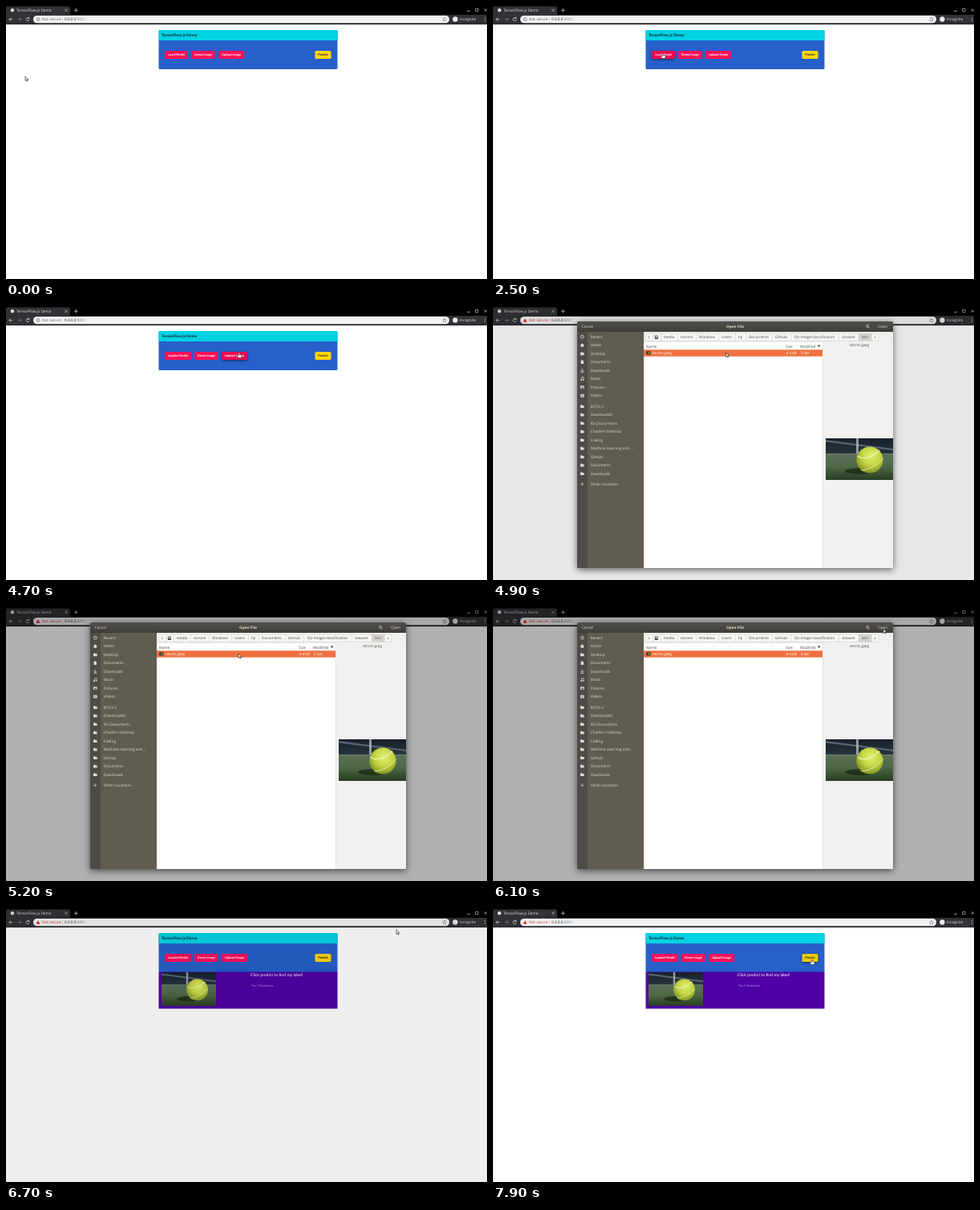
Recreate the animation shown at these times as an HTML page. Size 600 by 341 pixels, loop 8 s.

```html
<!DOCTYPE html>
<html lang="en">
<head>
<meta charset="utf-8">
<title>TensorFlow.js Demo</title>
<style>
html, body { margin: 0; width: 100%; height: 100%; overflow: hidden; background: #fff; }
svg { display: block; width: 100%; height: 100%; }
text { font-family: "Open Sans", "Noto Sans", sans-serif; font-size: 4.7px; text-rendering: geometricPrecision; white-space: pre; }
.app text { font-family: Lato, Inter, sans-serif; }
.line { fill: none; stroke-linecap: round; stroke-linejoin: round; }
</style>
</head>
<body>
<svg id="stage" viewBox="0 0 600 341" preserveAspectRatio="none"></svg>
<script>
const LOOP = 8000, STEP = 100;
const OPEN_AT = 4800, CLOSE_AT = 6600, LOADED_AT = 3100;

const rect = (x, y, w, h, fill, more = '') =>
  `<rect x="${x}" y="${y}" width="${w}" height="${h}" fill="${fill}" ${more}/>`;
const text = (x, y, label, fill, more = '') =>
  `<text x="${x}" y="${y}" fill="${fill}" ${more}>${label}</text>`;
const line = (d, stroke, width = 0.7, more = '') =>
  `<path class="line" d="${d}" stroke="${stroke}" stroke-width="${width}" ${more}/>`;
const shape = (d, fill, more = '') => `<path d="${d}" fill="${fill}" ${more}/>`;
const circle = (x, y, r, fill, more = '') =>
  `<circle cx="${x}" cy="${y}" r="${r}" fill="${fill}" ${more}/>`;
const middle = 'text-anchor="middle"';

function browser() {
  const pale = '#dadce0';
  return rect(0, 0, 600, 11, '#000') +
    shape('M0 11V2Q0 .5 2 .5H78Q80 .5 80 3V11Z', '#303236') +
    rect(0, 11, 600, 12, '#303236') + rect(0, 22.5, 600, 0.6, '#17181a') +
    circle(8, 5.3, 2.2, pale) +
    text(13, 7, 'TensorFlow.js Demo', '#e8eaed') +
    line('M73.5 3.8l3 3m0-3l-3 3', pale, 0.6) +
    line('M85.3 5.3h4m-2-2v4', pale, 0.7) +
    line('M575.5 6.3h3', pale, 0.7) +
    line('M586 3.5h3v3.2h-3z', pale, 0.6) +
    line('M597 3.8l2.6 2.6m0-2.6l-2.6 2.6', pale, 0.7) +
    line('M8 16.6H4m1.8-1.9L4 16.6l1.8 1.9', pale) +
    line('M15 16.6h4m-1.8-1.9l1.8 1.9-1.8 1.9', '#85878a') +
    line('M28.6 15.2A2.1 2.1 0 1 0 29 17.2M28.9 14v1.5h-1.5', pale) +
    rect(34, 12, 519, 9.3, '#f1f3f4', 'rx="4.65"') +
    `<g id="info">${circle(40, 16.6, 2, 'none', 'stroke="#5f6368" stroke-width=".6"')}${rect(39.7, 16.2, 0.6, 1.6, '#5f6368')}${rect(39.7, 15.3, 0.6, 0.6, '#5f6368')}</g>` +
    `<g id="warn">${shape('M40 14.2l2.6 4.5h-5.2z', '#d93025')}</g>` +
    text(45, 18.3, 'Not secure', '#5f6368', 'id="secure" font-size="4.6"') +
    rect(70, 14.3, 0.5, 4.8, '#bdc1c6') +
    text(73, 18.3, '0.0.0.0<tspan fill="#80868b">:8001</tspan>', '#202124') +
    line('M547 14.3l.75 1.6 1.75.2-1.3 1.2.35 1.8-1.55-.9-1.55.9.35-1.8-1.3-1.2 1.75-.2z', '#5f6368', 0.5) +
    circle(560.4, 16.5, 3.2, '#e8eaed') +
    text(566, 18.3, 'Incognito', '#e8eaed') +
    [14.6, 16.6, 18.6].map(y => circle(597.3, y, 0.5, pale)).join('');
}

// Soft stand-in for a photo of a ball on a court, 84 by 52 units.
function photo(x, y, scale) {
  return `<g transform="translate(${x} ${y}) scale(${scale})" clip-path="url(#frame)">` +
    rect(0, 0, 84, 52, 'url(#backdrop)') +
    rect(0, 19, 84, 33, 'url(#court)') +
    shape('M0 2L84 13V15L0 4.5Z', '#8796a5', 'opacity=".55"') +
    shape('M38 0h3v19h-3z', '#b9c4cb', 'opacity=".75"') +
    line('M0 19.5H84', '#8c9a8b', 0.8, 'opacity=".6"') +
    `<ellipse cx="43" cy="41" rx="19" ry="4" fill="#16240f" opacity=".7"/>` +
    circle(55, 27, 16.6, 'url(#felt)') +
    line('M39.5 22Q50 30 67 15', '#edf3bd', 1.1) +
    line('M45 40Q60 39 71.4 25', '#dfe9a2', 1) + '</g>';
}

const button = id => `<g id="${id}"><rect y="56" height="10" rx="1.6"/>` +
  `<text y="62.3" ${middle} font-weight="700" style="font-size:3.95px"></text></g>`;

function app() {
  return '<g class="app">' +
    rect(190.5, 30, 223, 49, '#2760c9', 'rx="1.6"') +
    shape('M190.5 43V31.6Q190.5 30 192 30H412Q413.5 30 413.5 31.6V43Z', '#00d2e3') +
    text(194, 38.2, 'TensorFlow.js Demo', '#10242b', 'font-weight="700" style="font-size:4.95px"') +
    ['load', 'demo', 'upload', 'predict'].map(button).join('') +
    '<g id="result">' + rect(190.5, 78.5, 223, 46, '#4f00a6') + photo(194, 79, 0.81) +
    text(305, 84.2, 'Click predict to find my label!', '#fff', 'style="font-size:5.15px"') +
    text(306, 96.7, 'Top 5 Predictions', '#b79bdc', 'style="font-size:3.6px"') +
    '</g></g>';
}

const ink = '#dfdbd2';
const icons = {
  clock: circle(0, 0, 2, 'none', `stroke="${ink}" stroke-width=".7"`) + line('M0-1V0H1', ink, 0.5),
  home: shape('M-2.5 0L0-2.4 2.5 0H1.8V2.1H-1.8V0Z', ink),
  folder: shape('M-2.3-1.8H-.4L.2-1.1H2.3V2H-2.3Z', ink),
  page: shape('M-1.7-2.3H.7L1.7-1.3V2.3H-1.7Z', ink),
  down: line('M0-2V1.2M-1.5-.2L0 1.3 1.5-.2M-1.8 2.2H1.8', ink),
  music: line('M-.8 1.5V-1.8L1.8-2.2V1', ink) + circle(-1.4, 1.5, 0.9, ink) + circle(1.2, 1.1, 0.9, ink),
  picture: rect(-2.3, -1.8, 4.6, 3.7, ink) + shape('M-1.7 1.3L-.3-.6.5.4 1-.2 1.8 1.3Z', '#4e4c45'),
  film: rect(-2.2, -1.9, 4.4, 3.8, ink) + shape('M-.7-1L1.1 0-.7 1Z', '#4e4c45'),
  plus: line('M-1.6 0H1.6M0-1.6V1.6', ink, 0.6)
};

function sidebar() {
  const places = [['clock', 'Recent'], ['home', 'Home'], ['folder', 'Desktop'], ['page', 'Documents'],
    ['down', 'Downloads'], ['music', 'Music'], ['picture', 'Pictures'], ['film', 'Videos']];
  const folders = ['BITS3-2', 'DownloadsD', 'IDs,Documents', 'Chatfern Desktop', 'Coding',
    'Machine Learning and …', 'GitHub', 'Documents', 'Downloads'].map(name => ['folder', name]);
  const row = ([icon, name], y) =>
    `<g transform="translate(111.3 ${y})">${icons[icon]}</g>` + text(121.7, y + 1.7, name, ink);
  return rect(105, 31, 83, 295, '#605c50') + rect(105, 31, 13, 295, '#4e4c45') +
    places.map((p, i) => row(p, 37.2 + i * 10.5)).join('') +
    folders.map((p, i) => row(p, 124 + i * 10.5)).join('') +
    row(['plus', 'Other Locations'], 221.3);
}

function pathBar() {
  const crumbs = [['media', 209], ['tovram', 230], ['Windows', 253], ['Users', 281], ['hp', 302],
    ['Documents', 315], ['GitHub', 348], ['tfjs-image-classification', 371], ['dataset', 431], ['test', 456]];
  const edges = [190, 199, ...crumbs.map(c => c[1]), 472, 481];
  return rect(188, 31, 311, 12.5, '#f0efed') +
    rect(190, 33, 291, 9.3, '#f7f6f5', 'rx="1.5" stroke="#c9c5bf" stroke-width=".5"') +
    rect(456, 33, 16, 9.3, '#d5d2cd') +
    edges.slice(1, -1).map(x => rect(x, 33, 0.5, 9.3, '#cdc9c3')).join('') +
    line('M195.2 36.4l-1.2 1.3 1.2 1.3M476 36.4l1.2 1.3-1.2 1.3', '#4c4c4c', 0.6) +
    rect(201.8, 35.5, 4, 4.4, '#4c4c4c', 'rx=".5"') + rect(202.7, 36.4, 2.2, 1.4, '#f7f6f5') +
    crumbs.map(([name, x], i) => text((x + edges[i + 3]) / 2, 39.4, name, '#4c4c4c', middle)).join('');
}

function dialog() {
  return `<g id="dialog"><g style="filter:drop-shadow(0 2px 4px rgba(0,0,0,.6))">` +
    rect(105, 18, 394, 308, '#f2f1ef', 'rx="1.5"') + '</g>' +
    shape('M105 31.2V19.5Q105 18 106.500 18H497.500Q499 18 499 19.500V31.2Z', 'url(#titlebar)') +
    text(110.5, 26.1, 'Cancel', ink) +
    text(302, 26.1, 'Open File', ink, `${middle} font-weight="700"`) +
    circle(467, 23.8, 1.5, 'none', `stroke="${ink}" stroke-width=".7"`) + line('M468.2 25l1.4 1.4', ink, 0.8) +
    text(480, 26.1, 'Open', ink) +
    sidebar() + rect(188, 43, 223, 283, '#fff') + pathBar() +
    rect(188, 43.3, 223, 0.4, '#d5d2cd') +
    text(191, 50.5, 'Name', '#4c4c4c') + text(365, 50.5, 'Size', '#4c4c4c') +
    text(383, 50.5, 'Modified', '#4c4c4c') + shape('M404.600 47.500h4l-2 2.700z', '#4c4c4c') +
    rect(188, 53.3, 223, 8.4, '#ef7141') +
    rect(191.3, 55.2, 5, 4.2, '#30372c') + circle(194.300, 57.300, 1, '#a8b93c') +
    text(199, 59.2, 'tennis.jpeg', '#fff') +
    text(365.5, 59.2, '4.4 kB', '#fff') + text(383.5, 59.2, '3 Apr', '#fff') +
    rect(411, 43.3, 0.5, 282.7, '#dcd9d5') +
    text(457, 49, 'tennis.jpeg', '#4c4c4c', middle) + photo(415, 164, 1) + '</g>';
}

const gradient = (id, stops, more = 'x2="0" y2="1"', kind = 'linear') => `<${kind}Gradient id="${id}" ${more}>` +
  stops.map((c, i) => `<stop offset="${i / (stops.length - 1)}" stop-color="${c}"/>`).join('') + `</${kind}Gradient>`;

const stage = document.getElementById('stage');
stage.innerHTML = '<defs>' +
  gradient('titlebar', ['#514f48', '#3f3d38']) +
  gradient('backdrop', ['#17202b', '#2d3b43', '#344239']) +
  gradient('court', ['#5b7059', '#4d6845', '#273d22']) +
  gradient('felt', ['#e3ef73', '#c3d541', '#75891f'], 'cx=".55" cy=".35" r=".7"', 'radial') +
  '<clipPath id="frame"><rect width="84" height="52"/></clipPath></defs>' +
  rect(0, 0, 600, 341, '#fff') + browser() + app() +
  rect(0, 0, 600, 341, '#000', 'id="dim"') + dialog() +
  '<g id="pointer">' +
  shape('M0 0V5.400L1.300 4.200 2.200 6.200 3.100 5.800 2.200 3.900H4Z', '#fff',
    'id="arrow" stroke="#111" stroke-width=".6" stroke-linejoin="round"') +
  shape('M-.7 .4Q0-.7.7.4V2.500L2.700 2.900Q3.400 3.200 3.200 4.200L2.500 6.500H-1.200L-2.700 3.900Q-2.500 2.900-1.500 3.500L-.7 4.100Z', '#fff',
    'id="hand" stroke="#111" stroke-width=".5" stroke-linejoin="round"') + '</g>';

const $ = id => document.getElementById(id);
const show = (id, on) => $(id).setAttribute('visibility', on ? 'visible' : 'hidden');
const clamp = v => Math.max(0, Math.min(1, v));

// Pointer stops: time, x, y.
const stops = [
  [0, 24, 88], [600, 166, 80], [700, 166, 80], [1600, 211, 60], [2200, 212, 59], [2500, 212, 59],
  [2850, 221, 116], [3200, 236, 83], [4100, 285, 63], [4400, 291, 57], [5300, 290, 57],
  [6000, 487, 26], [7100, 487, 26], [7700, 398, 63], [8000, 398, 63]
];

function pointerAt(t) {
  const i = Math.max(1, stops.findIndex(s => s[0] > t));
  const [t0, x0, y0] = stops[i - 1], [t1, x1, y1] = stops[i];
  const u = (t - t0) / (t1 - t0), k = u * u * (3 - 2 * u);
  return [x0 + (x1 - x0) * k, y0 + (y1 - y0) * k];
}

function setButton(id, x, width, label, hover) {
  const [box, caption] = $(id).children;
  const yellow = id === 'predict';
  box.setAttribute('x', x);
  box.setAttribute('width', width);
  box.setAttribute('fill', yellow ? (hover ? '#efc900' : '#ffd70c') : (hover ? '#ed0a50' : '#ff1059'));
  box.style.filter = hover ? 'drop-shadow(0 1px 1.5px rgba(0,0,0,.55))' : 'none';
  caption.setAttribute('x', x + width / 2);
  caption.setAttribute('fill', yellow ? '#222' : '#fff');
  caption.textContent = label;
}

function render(t) {
  const loaded = t >= LOADED_AT, modal = t >= OPEN_AT && t < CLOSE_AT, warned = t >= OPEN_AT;
  const [px, py] = pointerAt(t);
  const shift = loaded ? 4 : 0;
  let hovering = false;
  [['load', 198, 29 + shift, loaded ? 'Loaded Model' : 'Load Model'],
    ['demo', 231 + shift, 29.5, 'Demo Image'],
    ['upload', 265 + shift, 32, 'Upload Image'],
    ['predict', 385.5, 20, 'Predict']].forEach(([id, x, width, label]) => {
    const hover = !modal && px >= x && px <= x + width && py >= 56 && py <= 66;
    hovering = hovering || hover;
    setButton(id, x, width, label, hover);
  });

  show('info', !warned);
  show('warn', warned);
  $('secure').setAttribute('fill', warned ? '#d93025' : '#5f6368');
  show('result', t >= CLOSE_AT);
  show('dialog', modal);
  $('dim').setAttribute('opacity', 0.31 * (clamp((t - 4825) / 250) - clamp((t - 6505) / 250)));

  $('pointer').setAttribute('transform', `translate(${px} ${py})`);
  show('arrow', !hovering);
  show('hand', hovering);
}

function tick() {
  const t = performance.now() % LOOP;
  render(Math.floor(t / STEP) * STEP);
  requestAnimationFrame(tick);
}
tick();
</script>
</body>
</html>
```
